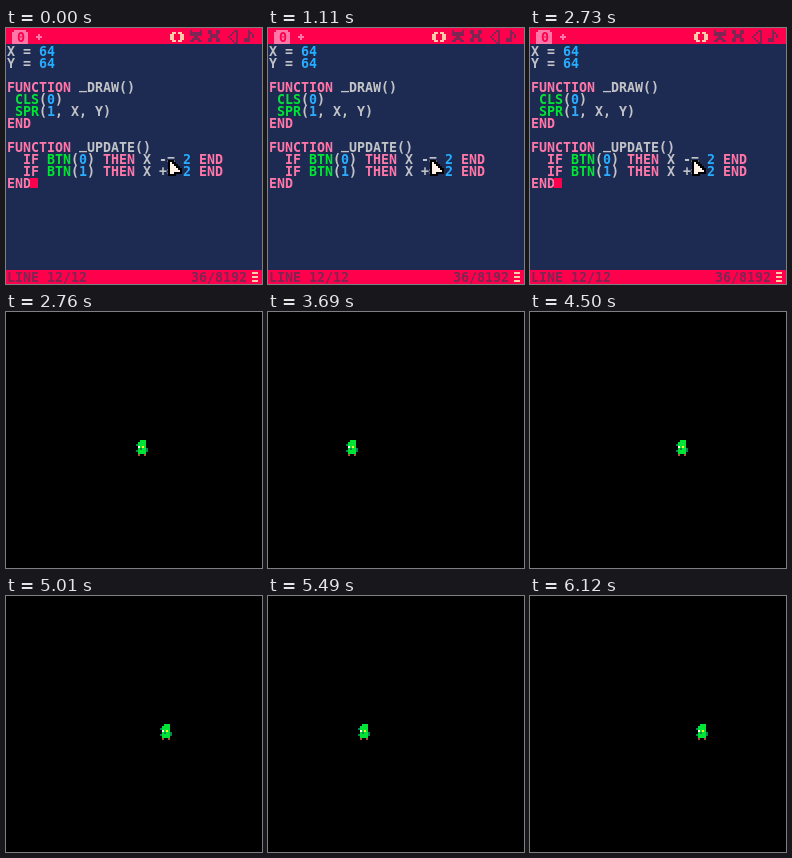
Write an HTML page with a canvas that moves like this. It is 256 by 256 pixels and loops after 6630 ms.

```html
<!DOCTYPE html>
<html lang="en">
<head>
<meta charset="utf-8">
<title>Code editor and game</title>
<style>
  html, body { margin: 0; width: 100%; height: 100%; overflow: hidden; background: #000; }
  canvas { display: block; width: 256px; height: 256px; }
</style>
</head>
<body>
<canvas id="stage" width="256" height="256"></canvas>
<script>
const ctx = document.getElementById('stage').getContext('2d');
const LOOP = 6630, TICK = 30, CELL = 8, ROW = 12;
const C = {
  navy: '#1d2b53', plum: '#7e2553', teal: '#008751', brown: '#ab5236',
  gray: '#c2c3c7', white: '#fff1e8', red: '#ff004d', yellow: '#ffec27',
  green: '#00e436', blue: '#29adff', pink: '#ff77a8', peach: '#ffccaa'
};
const CODE = [
  'X = 64',
  'Y = 64',
  '',
  'FUNCTION _DRAW()',
  ' CLS(0)',
  ' SPR(1, X, Y)',
  'END',
  '',
  'FUNCTION _UPDATE()',
  '  IF BTN(0) THEN X -= 2 END',
  '  IF BTN(1) THEN X += 2 END',
  'END'
];

// One art pixel covers 2 x 2 stage pixels.
function px(color, x, y, w = 1, h = 1) {
  ctx.fillStyle = color;
  ctx.fillRect(x * 2, y * 2, w * 2, h * 2);
}

function text(str, x, top, color) {
  ctx.fillStyle = color;
  ctx.fillText(str, x - 1, top + (str === '_' ? 7 : 10));
}

function tokenColor(token) {
  if (/^(FUNCTION|IF|THEN|END)$/.test(token)) return C.pink;
  if (/^(CLS|SPR|BTN)$/.test(token)) return C.green;
  return /^\d/.test(token) ? C.blue : C.gray;
}

function drawCode() {
  CODE.forEach((line, row) => {
    for (const m of line.matchAll(/_|[A-Z]+|\d+|[^\sA-Z\d_]+/g)) {
      text(m[0], 2 + m.index * CELL, 18 + row * ROW, tokenColor(m[0]));
    }
  });
}

function drawIcons() {
  // Code brackets
  for (const [side, tip] of [[82, 83], [88, 87]]) {
    px(C.peach, side, 3, 1, 3);
    px(C.peach, tip, 2, 1, 5);
  }
  px(C.peach, 84, 2); px(C.peach, 84, 6);
  px(C.peach, 86, 2); px(C.peach, 86, 6);
  // Sprite
  px(C.plum, 92, 1, 1, 3); px(C.plum, 97, 1, 1, 3);
  px(C.plum, 93, 2, 4, 4); px(C.plum, 92, 6, 2); px(C.plum, 96, 6, 2);
  px(C.red, 93, 4); px(C.red, 96, 4);
  // Map
  for (const x of [101, 105]) {
    px(C.plum, x, 1, 2, 2);
    px(C.plum, x, 5, 2, 2);
  }
  px(C.plum, 102, 3, 4, 2);
  // Speaker
  for (let i = 0; i < 4; i++) {
    px(C.plum, 111 + i, 4 - i);
    px(C.plum, 111 + i, 4 + i);
  }
  px(C.plum, 115, 1, 1, 7);
  // Note
  px(C.plum, 121, 1, 1, 6); px(C.plum, 122, 2);
  px(C.plum, 123, 3, 1, 2); px(C.plum, 119, 5, 2, 2);
}

function drawPointer(x, y) {
  const rows = [1, 2, 3, 4, 5, 2];
  rows.forEach((w, i) => px('#000', x - 1, y + i - 1, w + 2, 3));
  rows.forEach((w, i) => px(C.white, x, y + i, w));
}

function drawEditor(caretOn) {
  px(C.navy, 0, 0, 128, 128);
  px(C.red, 0, 0, 128, 8);
  px(C.red, 0, 121, 128, 7);

  px(C.pink, 4, 1, 6, 1);
  px(C.pink, 3, 2, 8, 6);
  text('0', 12, 4, C.red);
  px(C.pink, 15, 4, 3); px(C.pink, 16, 3, 1, 3);
  drawIcons();

  drawCode();
  if (caretOn) px(C.red, 12, 75, 4, 5);
  text('LINE 12/12', 2, 244, C.plum);
  text('36/8192', 186, 244, C.plum);
  for (const y of [122, 124, 126]) px(C.peach, 123, y, 3);
  drawPointer(82, 67);
}

function drawGame(x) {
  px('#000', 0, 0, 128, 128);
  const y = 64;
  px(C.green, x + 2, y, 3);
  px(C.green, x + 1, y + 1, 4, 6);
  px(C.teal, x, y + 2); px(C.teal, x + 5, y + 4);
  px(C.teal, x, y + 5); px(C.teal, x + 5, y + 5);
  px(C.white, x + 1, y + 3); px(C.yellow, x + 3, y + 3);
  px(C.teal, x + 2, y + 4);
  px(C.brown, x + 1, y + 7); px(C.brown, x + 4, y + 7);
}

// Each run: time of its first step, number of steps, direction.
const RUNS = [[3330, 16, -1], [3930, 29, 1], [4830, 23, -1], [5580, 19, 1]];

function heroX(t) {
  return RUNS.reduce((x, [start, count, dir]) => {
    const steps = Math.floor((t - start) / TICK) + 1;
    return x + 2 * dir * Math.max(0, Math.min(count, steps));
  }, 65);
}

function frame(now) {
  const t = Math.floor((now % LOOP) / TICK) * TICK;
  ctx.font = 'bold 13.29px "DejaVu Sans Mono", monospace';
  if (t < 2760) {
    const toggles = Math.floor((t - 180) / 230) + 1;
    drawEditor(toggles % 2 === 0);
  } else {
    drawGame(heroX(t));
  }
  requestAnimationFrame(frame);
}
frame(0);
</script>
</body>
</html>
```
